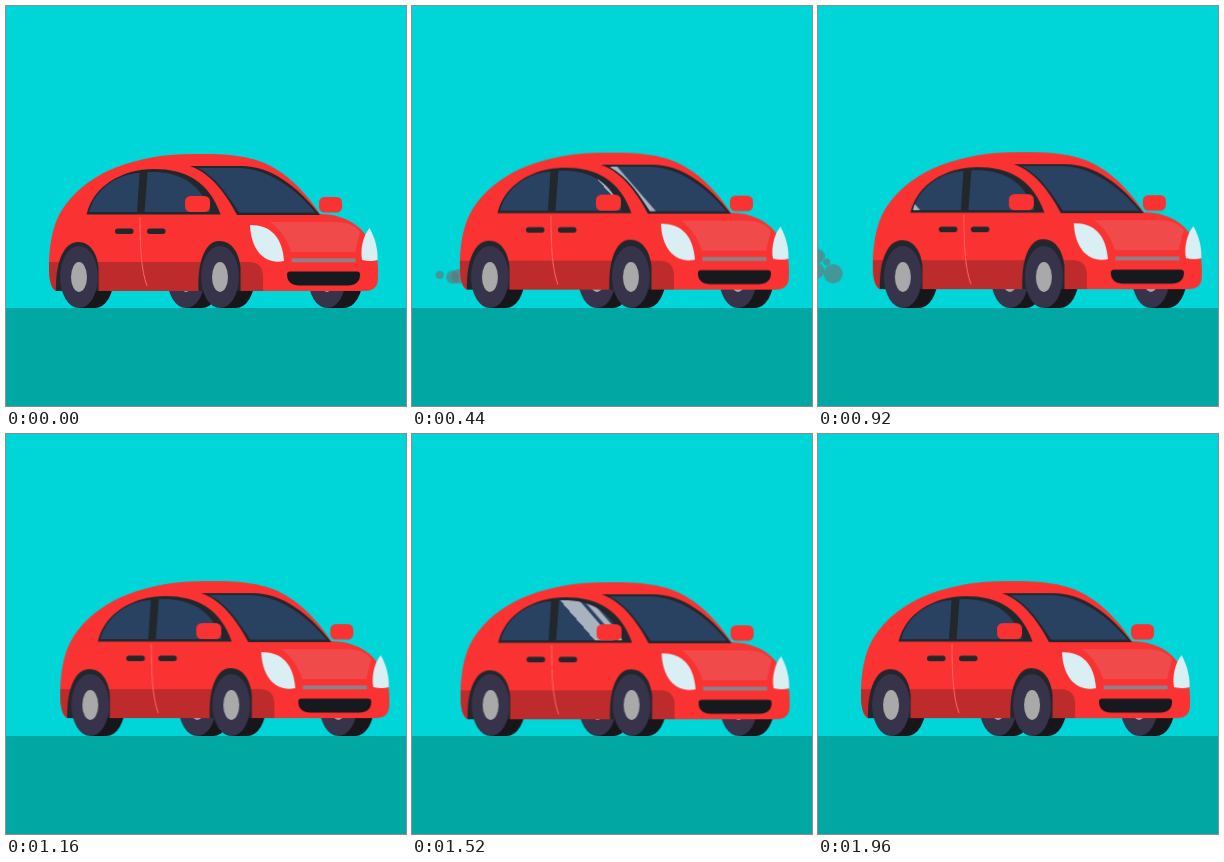
These frames come from a looping animation (400x400 px, 2000 ms). An HTML page:

```html
<!DOCTYPE html>
<html lang="en">
<head>
<meta charset="utf-8">
<title>Red car</title>
<style>
  html, body { margin: 0; width: 100%; height: 100%; overflow: hidden; background: #00d5d8; }
  svg { display: block; width: 100vw; height: 100vh; }

  .car { animation: roll 1s cubic-bezier(.37, 0, .63, 1) infinite alternate; }
  .body { animation: bob 250ms cubic-bezier(.37, 0, .63, 1) -440ms infinite alternate; }
  .shine { animation: sweep 1s cubic-bezier(.333, .5, .667, .832) infinite; }
  .puff { fill: #6e6e70; opacity: 0; animation: drift 2s linear infinite; }

  @keyframes roll { to { transform: translateX(12px); } }
  @keyframes bob {
    from { transform: translateY(.5px); }
    to { transform: translateY(-3.5px); }
  }
  @keyframes sweep {
    from { transform: translateX(431px); }
    to { transform: translateX(54px); }
  }
  @keyframes drift {
    0%, 14.99% { opacity: 0; transform: translate(var(--from)) scale(var(--r0)); }
    15% { opacity: .6; transform: translate(var(--from)) scale(var(--r0)); }
    50% { opacity: .6; }
    57%, 100% { opacity: 0; transform: translate(var(--to)) scale(var(--r1)); }
  }

  .red { fill: #fb3232; }
  .low { fill: #bd2b2d; }
  .trim { fill: #22272c; }
  .glass { fill: #2a4262; }
  .lamp { fill: #d9eff4; }
  .tyre { fill: #36334a; }
  .tread { fill: #17171b; }
  .hub { fill: #a9a9a9; }
</style>
</head>
<body>
<svg viewBox="0 0 400 400" preserveAspectRatio="none">
  <defs>
    <path id="shell" d="M50 285C45 282 43 275 43 260C43 235 48 213 60 198C84 166 130 148 188 148C232 147 255 152 276 167C292 179 304 193 314 208C335 208 350 217 358 227C368 240 372 250 372 264V272Q372 285 358 285Z"/>
    <path id="rearGlass" d="M83 206C89 183 111 168 133.500 167L131 206Z"/>
    <path id="frontGlass" d="M141.500 166C170 165 193 174 204.500 206H138.500Z"/>
    <path id="windshield" d="M192 162H234C262 163 290 183 309.500 206.500H233C222 190 211 172 192 162Z"/>
    <clipPath id="shellClip"><use href="#shell"/></clipPath>
    <clipPath id="glassClip">
      <use href="#rearGlass"/><use href="#frontGlass"/><use href="#windshield"/>
    </clipPath>
    <path id="tread" class="tread" d="M0-31H16A19 31 0 0 1 16 31H0Z"/>
    <g id="face">
      <ellipse class="tyre" rx="19" ry="31"/>
      <ellipse class="hub" rx="8" ry="15"/>
    </g>
  </defs>

  <rect width="400" height="400" fill="#00d5d8"/>
  <rect y="302" width="400" height="98" fill="#00a7a3"/>

  <g id="smoke"></g>

  <g class="car">
    <use href="#tread" x="180" y="271"/>
    <use href="#face" x="180" y="271"/>
    <use href="#tread" x="322" y="271"/>
    <use href="#face" x="321" y="271"/>
    <use href="#tread" x="73" y="271"/>
    <use href="#tread" x="214" y="271"/>

    <g class="body">
      <rect class="red" x="313" y="191" width="23" height="15.500" rx="5.500"/>
      <use href="#shell" class="red"/>
      <g clip-path="url(#shellClip)">
        <path class="low" d="M40 256H242Q257 256 257 271V286H40Z"/>
        <path class="trim" d="M50 286C49 258 57 236 72 236C84 236 91 247 92.500 262V286Z"/>
        <path class="trim" d="M192.500 286C191 256 199 235 213 235C226 235 233 247 234.500 262V286Z"/>
      </g>

      <path class="trim" d="M80.500 208.500C87 180 116 163 148 163C180 163 203 176 214.500 208.500Z"/>
      <path class="trim" d="M184 160H235C265 160 291 180 314 209H231C222 192 207 168 184 160Z"/>
      <use href="#rearGlass" class="glass"/>
      <use href="#frontGlass" class="glass"/>
      <use href="#windshield" class="glass"/>
      <g clip-path="url(#glassClip)">
        <g class="shine">
          <g transform="translate(0 187) skewX(41)" fill="#fff" opacity=".6">
            <rect x="-27" y="-40" width="19" height="70"/>
            <rect x="-3.500" y="-40" width="7" height="70"/>
          </g>
        </g>
      </g>

      <rect class="red" x="179" y="190" width="25" height="16" rx="5.500"/>
      <rect class="trim" x="109" y="222.500" width="18.500" height="5.500" rx="2.700"/>
      <rect class="trim" x="141" y="222.500" width="18.500" height="5.500" rx="2.700"/>
      <path d="M134 211C134 240 135 264 141 280" fill="none" stroke="#ff6a66"/>

      <path fill="#f04a4a" d="M264 216H328C342 216 350 220 354 226L349 246H285C281 234 275 224 264 216Z"/>
      <path class="lamp" d="M244 219C265 219 276 231 278 255C260 259 245 246 244 219Z"/>
      <path class="lamp" d="M363.500 222C369 232 372 243 371.500 254Q365 256 356 254C354 243 357 230 363.500 222Z"/>
      <rect x="285.500" y="252.300" width="64" height="4" fill="#8d8187"/>
      <path fill="#16191e" d="M284 265.500H351Q354 265.500 354 268.500C354 276 349 279.500 342 279.500H293C286 279.500 281 276 281 268.500Q281 265.500 284 265.500Z"/>
    </g>

    <use href="#face" x="73" y="271"/>
    <use href="#face" x="214" y="271"/>
  </g>
</svg>
<script>
  // Each puff: start x, y, radius, then end x, y, radius.
  const puffs = [
    [47, 276, 4, -68, 234, 4],
    [61, 273.7, 6.1, -60, 258, 8.7],
    [61, 272, 7, -24, 262, 8.500],
    [75, 275.7, 1, -6, 265, 12.6],
    [90, 287, 4, -20, 245, 3.3],
    [106, 281, 7, -38, 239, 7]
  ];
  const smoke = document.getElementById('smoke');
  for (const [x0, y0, r0, x1, y1, r1] of puffs) {
    const puff = document.createElementNS('http://www.w3.org/2000/svg', 'circle');
    puff.setAttribute('class', 'puff');
    puff.setAttribute('r', 1);
    puff.style.cssText =
      `--from:${x0}px,${y0}px;--to:${x1}px,${y1}px;--r0:${r0};--r1:${r1}`;
    smoke.append(puff);
  }
</script>
</body>
</html>
```
